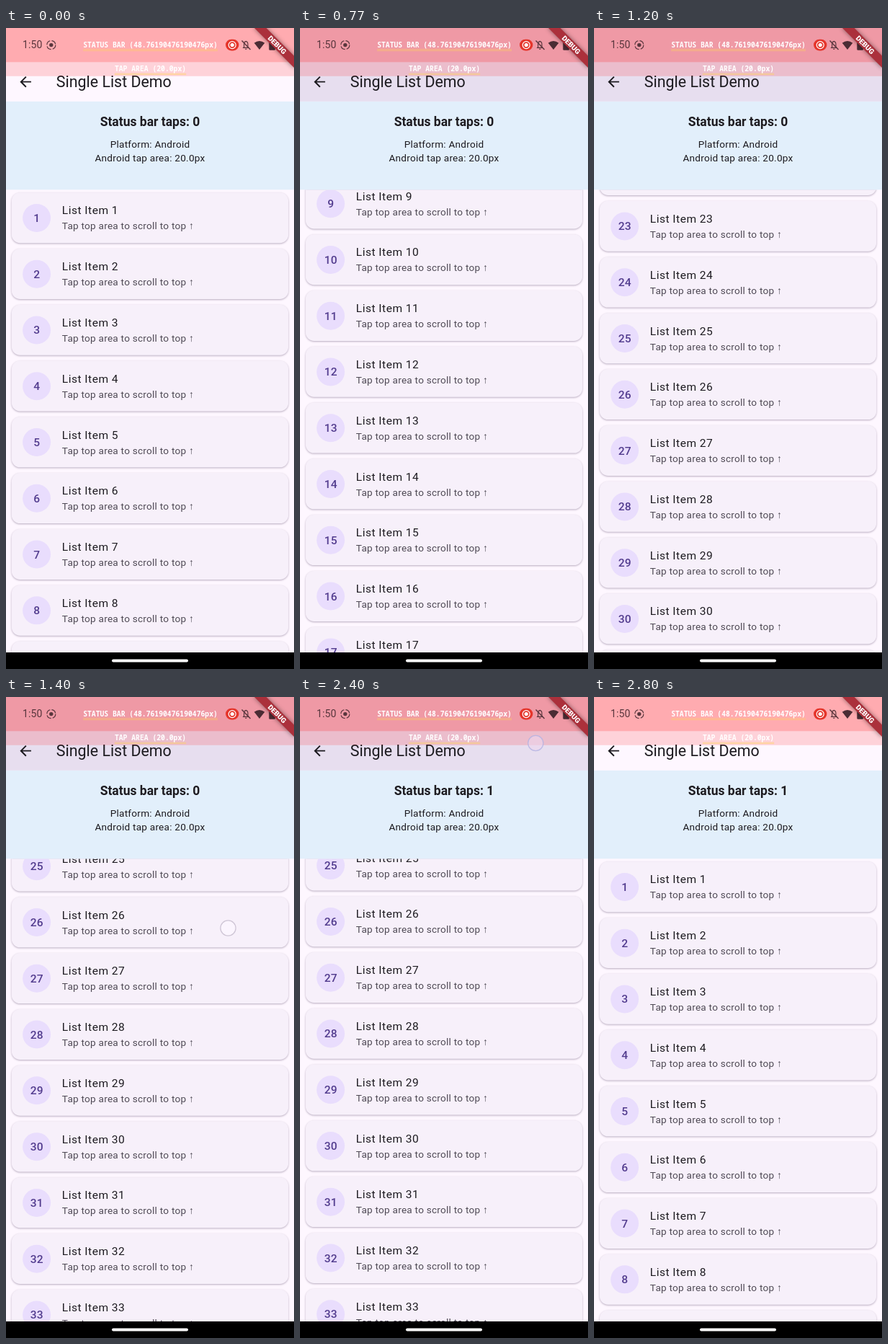
Recreate the animation shown at these times as an HTML page with a canvas. Size 400 by 889 pixels, loop 2860 ms.

```html
<!DOCTYPE html>
<html lang="en">
<head>
<meta charset="utf-8">
<title>Single List Demo</title>
<style>
  html, body { margin: 0; width: 100%; height: 100%; overflow: hidden; background: #fef7ff; }
  canvas { display: block; width: 400px; height: 889px; }
</style>
</head>
<body>
<canvas id="stage"></canvas>
<script>
const W = 400, H = 889, LOOP = 2860;
const PITCH = 77.78, LIST_TOP = 224.3, LIST_BOTTOM = 866;
const SANS = 'Roboto, "Liberation Sans", sans-serif';
const MONO = '"Noto Sans Mono", "DejaVu Sans Mono", monospace';
const canvas = document.getElementById('stage');
const ctx = canvas.getContext('2d');
const ratio = window.devicePixelRatio || 1;
canvas.width = W * ratio;
canvas.height = H * ratio;

function rect(x, y, w, h, color) {
  ctx.fillStyle = color;
  ctx.fillRect(x, y, w, h);
}

function pill(x, y, w, h, r, color) {
  ctx.beginPath();
  ctx.roundRect(x, y, w, h, r);
  ctx.fillStyle = color;
  ctx.fill();
}

function disc(x, y, r, color) {
  ctx.beginPath();
  ctx.arc(x, y, r, 0, Math.PI * 2);
  ctx.fillStyle = color;
  ctx.fill();
}

function ring(x, y, r, width, color) {
  ctx.beginPath();
  ctx.arc(x, y, r, 0, Math.PI * 2);
  ctx.lineWidth = width;
  ctx.strokeStyle = color;
  ctx.stroke();
}

function icon(path, x, y, size, color) {
  ctx.save();
  ctx.translate(x, y);
  ctx.scale(size / 24, size / 24);
  ctx.fillStyle = color;
  ctx.fill(new Path2D(path));
  ctx.restore();
}

function text(str, x, y, { size, weight = 400, family = SANS, color = '#1d1b20', spacing = 0, align = 'left' }) {
  ctx.font = `${weight} ${size}px ${family}`;
  ctx.letterSpacing = spacing + 'px';
  ctx.textAlign = align;
  ctx.fillStyle = color;
  ctx.fillText(str, x, y);
}

function recordedTime(t) {
  if (t < 570) return 0;
  if (t < 1200) return Math.min(1070, 570 + Math.floor((t - 570) / 100) * 100);
  return 1200 + Math.floor((t - 1200) / 100) * 100;
}

function scrollAt(t) {
  if (t < 570) return 0;
  if (t < 670) return 70;
  if (t <= 1400) {
    const dt = t - 770;
    return 642 + 3.47 * dt - 0.00235 * dt * dt;
  }
  if (t <= 2400) return 1896.5;
  return 1896.5 * Math.max(0, 1 - (t - 2400) / 300) ** 1.8;
}

function tintAt(t) {
  if (t < 570 || t >= 2800) return 0;
  return t >= 2700 ? 0.5 : 1;
}

function drawCard(n, top) {
  ctx.save();
  ctx.shadowColor = 'rgba(40,20,60,.32)';
  ctx.shadowBlur = 2.5 * ratio;
  ctx.shadowOffsetY = ratio;
  pill(7.8, top, 384.4, 70, 11.7, '#f7f0fa');
  ctx.restore();
  disc(42.6, top + 35.2, 19.5, '#e9ddfd');
  text(String(n), 42.8, top + 40.7, { size: 15.55, weight: 500, color: '#523c8e', spacing: 0.15, align: 'center' });
  text('List Item ' + n, 77.8, top + 30.2, { size: 15.55, spacing: 0.49 });
  text('Tap top area to scroll to top ↑', 77.8, top + 51.2, { size: 13.6, color: '#4f4a55', spacing: 0.24 });
}

function drawList(scroll) {
  ctx.save();
  ctx.beginPath();
  ctx.rect(0, LIST_TOP, W, LIST_BOTTOM - LIST_TOP);
  ctx.clip();
  const first = Math.max(1, Math.floor(scroll / PITCH));
  for (let n = first; n < first + 11; n++) {
    drawCard(n, LIST_TOP + 3.9 + (n - 1) * PITCH - scroll);
  }
  ctx.restore();
}

function drawHeader(taps) {
  rect(0, 101.8, W, LIST_TOP - 101.8, '#e2effb');
  text('Status bar taps: ' + taps, 200, 136, { size: 17.5, weight: 700, align: 'center' });
  const line = { size: 13.6, spacing: 0.24, align: 'center' };
  text('Platform: Android', 200, 165.5, line);
  text('Android tap area: 20.0px', 200, 185, line);
}

function debugLabel(str, baseline) {
  text(str, 200.5, baseline, { size: 9.72, weight: 700, family: MONO, color: '#fff', align: 'center' });
  const width = str.length * 5.84;
  for (const dy of [2.4, 4]) rect(200.5 - width / 2, baseline + dy, width, 0.7, 'rgba(255,214,90,.75)');
}

function drawStatusIcons() {
  const dark = '#59363d';
  text('1:50', 23, 28.4, { size: 14, color: dark, spacing: 0.1 });
  ctx.setLineDash([7.2, 2.2]);
  ring(62.8, 23.6, 6, 1.2, dark);
  ctx.setLineDash([]);
  disc(62.8, 23.6, 2.7, dark);

  pill(305, 15.8, 18.4, 15.6, 7.8, '#e5352b');
  ring(314.2, 23.6, 5, 1.2, '#fff');
  disc(314.2, 23.6, 2.6, '#fff');

  icon('M12 3c-4 1-5 4-5 7v6l-2 2v1h14v-1l-2-2v-6c0-3-1-6-5-7zm0 2.5c2.5.5 3.2 2.5 3.2 4.5v7H8.800v-7c0-2 .7-4 3.200-4.500zM10 20h4a2 2 0 0 1-4 0z', 325.5, 15.8, 15.5, dark);
  ctx.beginPath();
  ctx.moveTo(327.5, 17.5);
  ctx.lineTo(339.5, 30);
  ctx.lineWidth = 1.4;
  ctx.strokeStyle = dark;
  ctx.stroke();

  ctx.beginPath();
  ctx.moveTo(352, 30);
  ctx.lineTo(344.7, 20.8);
  ctx.quadraticCurveTo(352, 15.4, 359.3, 20.8);
  ctx.closePath();
  ctx.fillStyle = '#4b2c34';
  ctx.fill();

  pill(365.3, 18, 8.6, 12.8, 1.3, '#4b2c34');
  rect(367.5, 16.6, 4.2, 2, '#4b2c34');
}

function drawTopBar(tint) {
  rect(0, 0, W, 101.8, '#fef7ff');
  rect(0, 0, W, 101.8, `rgba(231,222,239,${tint})`);
  icon('M20 11H7.83l5.590-5.590L12 4l-8 8 8 8 1.410-1.410L7.830 13H20z', 15.5, 63, 23.3, '#1d1b20');
  text('Single List Demo', 69.8, 82, { size: 21.4 });
  rect(0, 0, W, 47.4, 'rgba(255,0,0,.31)');
  rect(0, 47.4, W, 19.4, 'rgba(255,0,0,.15)');
  drawStatusIcons();
  debugLabel('STATUS BAR (48.76190476190476px)', 27);
  debugLabel('TAP AREA (20.0px)', 60.4);
}

function drawBanner() {
  ctx.save();
  ctx.translate(W, 0);
  ctx.rotate(Math.PI / 4);
  ctx.shadowColor = 'rgba(0,0,0,.45)';
  ctx.shadowBlur = 6 * ratio;
  rect(-38.9, 27.2, 77.8, 11.7, '#ab303b');
  ctx.shadowColor = 'transparent';
  text('DEBUG', 0, 36.5, { size: 9.9, weight: 900, color: '#fff', align: 'center' });
  ctx.restore();
}

function drawTouch(t) {
  const touch = (x, y, fill, edge) => {
    disc(x, y, 10.6, fill);
    ring(x, y, 10.6, 1.3, edge);
  };
  if (t === 570) touch(308.5, 304.5, 'rgba(253,248,255,.85)', '#c9c0d0');
  else if (t >= 1400 && t < 1600) touch(308.5, 320.5, 'rgba(252,246,255,.7)', '#cfc6d6');
  else if (t >= 2300 && t < 2500) touch(327.3, 64, 'rgba(236,214,236,.6)', 'rgba(178,178,226,.8)');
}

function draw(t) {
  ctx.setTransform(ratio, 0, 0, ratio, 0, 0);
  rect(0, 0, W, H, '#fef7ff');
  drawList(scrollAt(t));
  drawHeader(t >= 2400 ? 1 : 0);
  drawTopBar(tintAt(t));
  drawTouch(t);
  drawBanner();
  rect(0, LIST_BOTTOM, W, H - LIST_BOTTOM, '#000');
  pill(147, 875.6, 106, 4, 2, '#fff');
}

const start = performance.now();
function tick() {
  draw(recordedTime((performance.now() - start) % LOOP));
  requestAnimationFrame(tick);
}
tick();
</script>
</body>
</html>
```
